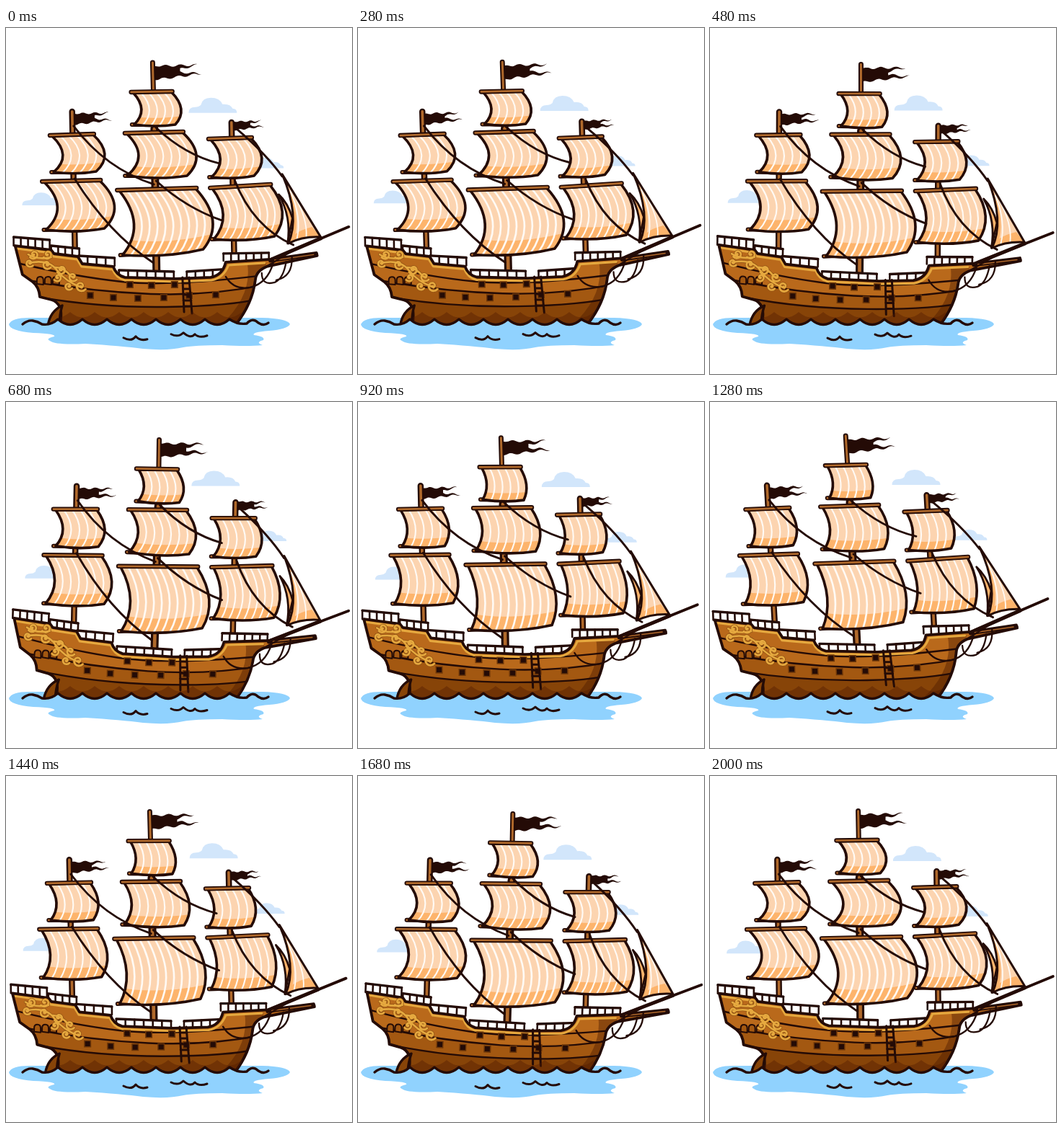
Animation of 480 by 480 pixels, one loop 2040 ms. Source, as an HTML page with a canvas:

```html
<!DOCTYPE html>
<html>
<head>
<meta charset="utf-8">
<style>
html, body { margin: 0; width: 100%; height: 100%; overflow: hidden; background: #fff; }
canvas { display: block; width: 100vw; height: 100vh; }
</style>
</head>
<body>
<canvas id="stage" width="480" height="480"></canvas>
<script>
const g = document.getElementById('stage').getContext('2d');
const LOOP = 2040, STEP = 40, INK = '#240b06', GOLD = '#e6a93f', WOOD = '#b0692b';
const PEACH = '#fcd4b0', ORANGE = '#fdb46c', CREAM = '#fffaf4';
g.lineCap = g.lineJoin = 'round';

const path = d => new Path2D(d);
const fill = (d, color) => { g.fillStyle = color; g.fill(d); };
const stroke = (d, width, color = INK) => {
  g.lineWidth = width;
  g.strokeStyle = color;
  g.stroke(d);
};
const mix = (a, b, u) => [a[0] + (b[0] - a[0]) * u, a[1] + (b[1] - a[1]) * u];

// Wooden bar: dark outline with a brown core
function spar(x1, y1, x2, y2, width) {
  const d = path(`M${x1} ${y1}L${x2} ${y2}`);
  stroke(d, width);
  stroke(d, width * .42, WOOD);
}

const CLOUD = path('M0 21Q0 13 9 13Q14 13 17 10Q19 0 31 0Q43 0 47 9Q58 8 61 15Q67 15 67 21Z');
const WATER = path('M4 411Q8 402 32 402H355Q391 403 394 411Q390 418 365 420Q340 422 344 426Q360 428 357 433' +
  'Q345 436 356 440Q335 442 300 440Q262 440 246 443Q225 448 190 445Q160 441 110 438Q68 440 61 434' +
  'Q54 431 67 428Q70 424 38 423Q5 420 4 411Z');
const SCALLOPS = 'M23 411Q30 405 37 406T50 411Q62 413 72 404' + 'q17 15 34 0'.repeat(7) +
  'Q322 412 334 410Q342 401 350 409Q358 414 364 409';
const WATERLINE = path(SCALLOPS);
const ABOVE = path(SCALLOPS + 'L480 409V0H0V411Z');
const SHADE = path('M55 394' + 'q17 15 34 0'.repeat(8) + 'V420H55Z');
const RIPPLES = path('M163 430Q174 436 180 428Q186 435 196 432M229 425Q239 430 246 423Q256 432 262 425Q268 431 279 427');

const DECK = 'M12 302L62 308L66 313L99 317L105 327L148 331Q152 343 164 346L235 348L283 346Q300 343 304 325';
const HULL = path(DECK + 'L366 321L430 312L431 316L361 331Q346 337 345 350Q340 388 310 420H73' +
  'Q77 396 74 388Q70 379 62 377L46 373Q45 359 36 352L22 342Z');
const RUDDER = path('M77 385Q60 393 57 413H73Q73 398 77 385Z');
const TRIM = path('M15 306L61 312L65 317L98 321L104 331L147 335Q152 347 164 350L235 352L284 350Q301 347 308 329L358 326');
const BAND = path('M0 350L36 350Q120 366 200 369T355 357V425H0Z');
const KEEL = path('M48 374Q130 388 220 387T355 375V425H0Z');
const BOW = path('M334 326Q342 376 288 420H360V326Z');
const PLANKS = path('M19 327Q95 345 160 352T350 344M36 351Q120 366 200 369T355 357M48 374Q130 388 220 387T355 375');
const LADDER = path('M244 346L246 394M253 346L257 396M244 354H254M245 362H254M245 370H255M245 378H256M246 386H256');
const ROPES = path('M94 136Q138 195 205 217M95 209Q142 285 204 326M208 138Q248 176 296 188' +
  'M208 212Q250 250 299 267M317 211Q342 276 398 301M320 140Q360 174 383 206');
const RIGGING = path('M304 345Q315 364 338 360Q362 354 370 326M354 340Q354 358 372 353Q384 348 388 324' +
  'M374 350Q397 345 396 318M362 330L402 306');
const INNER_JIB = path('M378 231Q396 262 390 299L397 264Q391 243 378 231Z');
const JIB = path('M383 203Q408 262 391 299Q410 289 436 290Z');
const JIB_SHADE = path('M383 203Q408 262 391 299Q410 289 436 290L424 276Q408 280 401 286Q408 250 383 203Z');

// Corners run top left, top right, bottom right, bottom left
function sail(tl, tr, br, bl, bulge, puff) {
  const w = tr[0] - tl[0], push = 2 * bulge * puff, sag = w * .08;
  const rib = u => {
    const a = mix(tl, tr, u), b = mix(bl, br, u), m = mix(a, b, .54);
    b[1] += 2 * sag * u * (1 - u);
    return [a, [m[0] + push, m[1]], b];
  };
  const [, lc] = rib(0), [, rc] = rib(1), foot = mix(bl, br, .55);
  spar(bl[0] - 3, bl[1], foot[0], foot[1], 6);
  const shape = path(`M${tl}L${tr}Q${rc} ${br}Q${foot[0]} ${foot[1] + sag} ${bl}Q${lc} ${tl}Z`);
  fill(shape, PEACH);
  g.save();
  g.clip(shape);
  const l = mix(tl, bl, .74), r = mix(tr, br, .74);
  fill(path(`M${l[0] - 5} ${l[1]}Q${foot[0]} ${l[1] + sag * 1.4} ${r[0] + 30} ${r[1] - 3}V${bl[1] + 30}H${l[0] - 5}Z`), ORANGE);
  const n = Math.round(w / 10.5);
  for (let i = 1; i < n; i++) {
    const [a, c, b] = rib(i / n);
    stroke(path(`M${a}Q${c} ${b}`), w > 100 ? 2.6 : 2.1, CREAM);
  }
  g.restore();
  stroke(shape, 3.6);
  spar(tl[0] - 3, tl[1] - 1, tr[0] + 1, tr[1] - 1, 6.4);
}

function flag(x, y, s, phase) {
  const pts = [];
  const wave = u => 1.5 * Math.sin(u * .3 - phase) * Math.min(1, u / 12);
  const add = (u, v) => pts.push([x + u * s, y + v * s]);
  const top = u => wave(u) - u * .03, low = u => 19 - u * .13 + wave(u + 3);
  for (let u = 0; u <= 60; u += 2) add(u, top(u));
  for (let u = 60; u >= 36; u -= 2) add(u, top(u) + (60 - u) * .22);
  for (let u = 36; u <= 66; u += 2) add(u, low(u) - (66 - u) * .2);
  for (let u = 66; u >= 0; u -= 2) add(u, low(u));
  fill(path('M' + pts.join('L') + 'Z'), INK);
}

function rail(x1, y1, x2, y2, h, n) {
  fill(path(`M${x1} ${y1}L${x2} ${y2}v${h}L${x1} ${y1 + h}Z`), '#fff');
  for (let i = 0; i <= n; i++) {
    const [x, y] = mix([x1, y1], [x2, y2], i / n);
    stroke(path(`M${x} ${y}v${h}`), 2.6);
  }
  stroke(path(`M${x1} ${y1}L${x2} ${y2}`), 3.4);
}

function curl(x, y, r, dir) {
  let d = '';
  for (let a = 0; a < 9; a += .4)
    d += `${d ? 'L' : 'M'}${x + dir * r * a / 9 * Math.cos(a)} ${y + r * a / 9 * Math.sin(a)}`;
  return d;
}
const SCROLL = path('M31 326Q58 320 70 336T104 360M30 314Q42 322 62 318M68 332Q80 332 90 345' +
  [[38, 314, 7, 1], [32, 326, 6, -1], [57, 314, 7, 1], [56, 328, 7, -1], [76, 335, 7, 1],
   [71, 346, 6, 1], [92, 345, 7, -1], [86, 358, 6, -1], [103, 358, 8, -1]].map(c => curl(...c)).join(''));
const PORTS = [[171, 356], [201, 357], [233, 356], [116, 371], [148, 374], [182, 375], [218, 374], [253, 371], [290, 370]];

function rigging(puff, phase) {
  flag(206, 53, 1, phase);
  flag(94, 119, .81, phase);
  flag(316, 130, .64, phase);
  spar(204, 48, 206, 140, 7);
  spar(206, 140, 208, 338, 11);
  spar(92, 116, 95, 305, 8.5);
  spar(313, 131, 316, 325, 8.5);
  sail([64, 150], [121, 148], [125, 199], [66, 200], 13, puff);
  sail([53, 214], [130, 212], [136, 278], [55, 280], 16, puff);
  sail([177, 90], [230, 89], [235, 134], [178, 134], 10, puff);
  sail([168, 147], [245, 145], [251, 205], [168, 205], 15, puff);
  sail([157, 226], [263, 223], [273, 307], [161, 315], 17, puff);
  sail([284, 155], [340, 153], [344, 205], [285, 207], 12, puff);
  sail([286, 223], [366, 218], [372, 289], [288, 293], 13, puff);
  stroke(ROPES, 2.9);
  fill(INNER_JIB, ORANGE);
  stroke(INNER_JIB, 2.8);
  fill(JIB, PEACH);
  fill(JIB_SHADE, ORANGE);
  stroke(path('M394 226Q410 262 403 293M400 233Q418 265 416 290'), 1.8, CREAM);
  stroke(JIB, 3);
}

function hull() {
  stroke(path('M372 319L475 276'), 3.8);
  stroke(path('M368 321L436 292'), 5);
  rail(10, 290, 60, 294, 12, 5);
  rail(62, 302, 101, 306, 10, 4);
  rail(100, 316, 150, 319, 11, 4);
  rail(156, 336, 232, 338, 10, 6);
  rail(250, 338, 298, 335, 11, 4);
  rail(301, 313, 364, 312, 10, 6);
  fill(HULL, '#b9691b');
  g.save();
  g.clip(HULL);
  fill(BAND, '#a35811');
  fill(KEEL, '#874408');
  fill(BOW, 'rgba(80,30,0,.45)');
  stroke(PLANKS, 2.4);
  stroke(TRIM, 3, GOLD);
  g.restore();
  stroke(HULL, 3.8);
  fill(RUDDER, '#874408');
  stroke(RUDDER, 3.4);
  stroke(path('M366 323L430 314'), 5);
  stroke(path('M372 322L426 314.5'), 1.5, WOOD);
  for (const [x, y] of PORTS) {
    g.fillStyle = '#6b3508';
    g.fillRect(x - 5, y - 5, 10, 10);
    g.fillStyle = INK;
    g.fillRect(x - 3.5, y - 3.5, 7, 7);
  }
  stroke(LADDER, 3);
  for (const x of [42, 53, 64]) {
    const d = path(`M${x} 355v-5q0 -5 4.500 -5q4.500 0 4.500 5v6Z`);
    fill(d, '#a35811');
    stroke(d, 2);
  }
  stroke(SCROLL, 4, '#8f5012');
  stroke(SCROLL, 2.6, GOLD);
  stroke(RIGGING, 2.3);
}

function draw(t) {
  const w = 2 * Math.PI / LOOP;
  const slow = Math.cos(w * (t - 100)), roll = Math.cos(2 * w * (t - 675));
  const tilt = .0115 + .0225 * roll;
  const lean = (.5 + 9.1 * roll + 3.3 * slow) / 245;
  const drift = -1.5 + 3.2 * slow + 1.9 * roll;
  const move = () => g.setTransform(1, tilt, -lean, 1, drift + 290 * lean, -72 * tilt);

  g.setTransform(1, 0, 0, 1, 0, 0);
  fill(path('M0 0H480V480H0Z'), '#fff');

  const cx = 1.7 + 2.6 * roll, cy = -1.8 + 1.9 * Math.cos(2 * w * (t - 920));
  for (const [x, y, s] of [[253, 97, 1], [22, 228.5, .85], [338, 180, .7]]) {
    g.setTransform(s, 0, 0, s, x + cx, y + cy);
    fill(CLOUD, '#d2e6fb');
  }
  g.setTransform(1, 0, 0, 1, 0, 0);
  fill(WATER, '#90d2fe');

  g.save();
  move();
  rigging(.82 + .25 * slow, 2 * w * t);
  g.restore();

  g.save();
  g.clip(ABOVE);
  move();
  hull();
  g.clip(HULL);
  g.setTransform(1, 0, 0, 1, 0, 0);
  fill(SHADE, 'rgba(80,25,0,.4)');
  g.restore();

  stroke(WATERLINE, 3.4);
  g.setTransform(1, 0, 0, 1, 0, .5 * roll);
  stroke(RIPPLES, 3);
}

const start = performance.now();
function tick() {
  const t = (performance.now() - start) % LOOP;
  draw(Math.floor(t / STEP) * STEP);
  requestAnimationFrame(tick);
}
tick();
</script>
</body>
</html>
```
